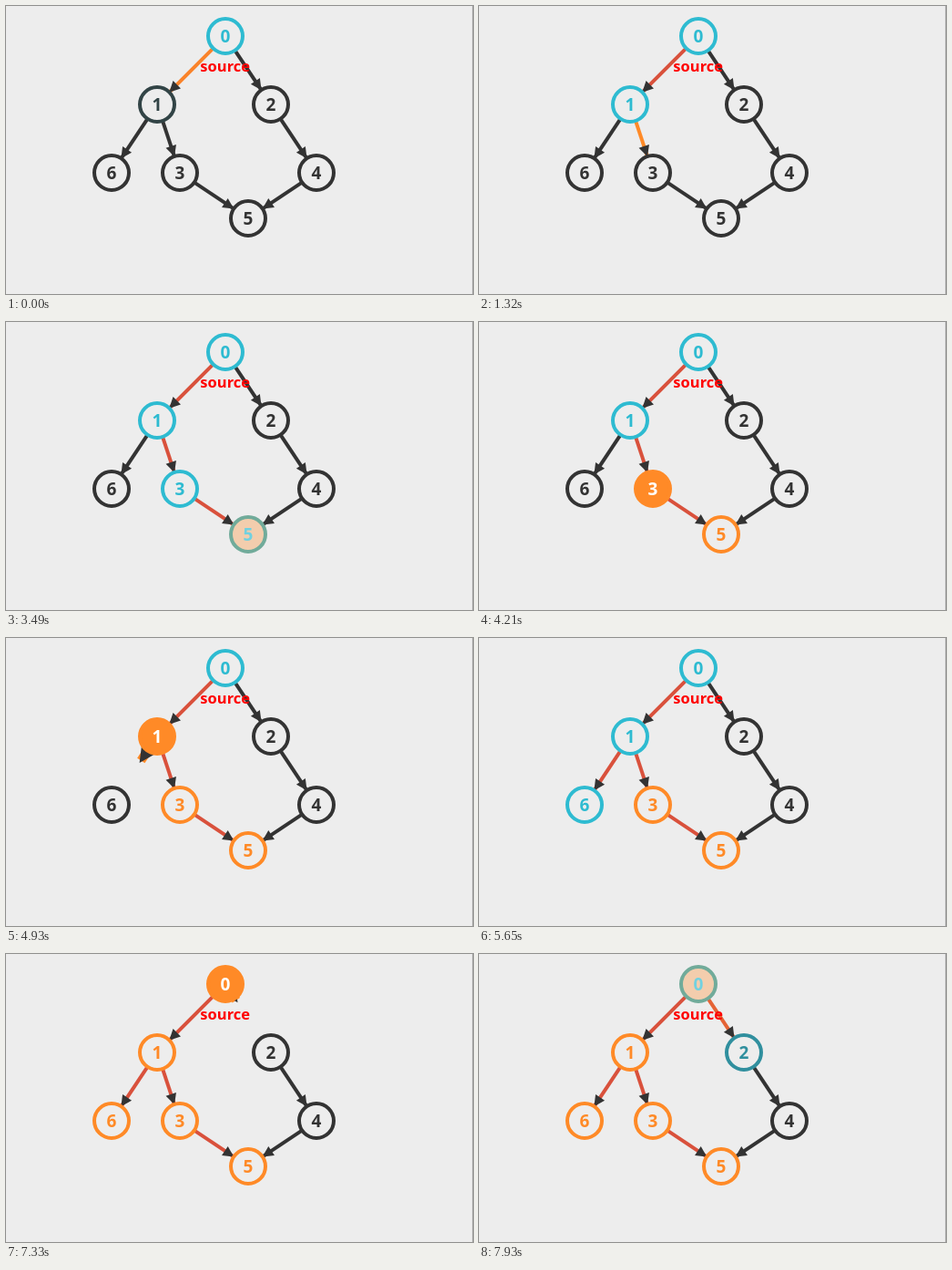
Write an HTML page with a canvas that moves like this. It is 513 by 316 pixels and loops after 8 s.

```html
<!DOCTYPE html>
<html lang="en">
<head>
<meta charset="utf-8">
<title>Depth-first search</title>
<style>
  html, body { margin: 0; width: 100%; height: 100%; overflow: hidden; background: #ededed; }
  canvas { display: block; width: 513px; height: 316px; }
</style>
</head>
<body>
<canvas id="stage"></canvas>
<script>
const WIDTH = 513, HEIGHT = 316, LOOP = 8000, TICK = 120, FADE = 320;
const RING = 19, REACH = 20, LINE = 4, GROWING_LINE = 10;

const PAPER = [237, 237, 237], DARK = [51, 51, 51], WHITE = [255, 255, 255];
const CYAN = [46, 187, 209], ORANGE = [255, 138, 39], RED = [217, 81, 60];

// Node styles are [ring, fill, text]; edge styles are [line].
const idle = [DARK, PAPER, DARK];
const seen = [CYAN, PAPER, CYAN];
const active = [ORANGE, ORANGE, WHITE];
const done = [ORANGE, PAPER, ORANGE];
const plain = [DARK], grow = [ORANGE], tree = [RED];

const nodes = [[241, 33], [166, 108], [291, 108], [191, 183], [341, 183], [266, 233], [116, 183]];
const edges = ['0-1', '0-2', '1-3', '1-6', '2-4', '3-5', '4-5'];

// Each step: start time and the styles it fades to.
const steps = [
  [-100, { '0-1': tree, 1: seen }],
  [440, { 1: active }],
  [920, { 1: seen, '1-3': grow }],
  [1410, { '1-3': tree, 3: seen }],
  [1890, { 3: active }],
  [2390, { 3: seen, '3-5': grow }],
  [2850, { '3-5': tree, 5: seen }],
  [3342, { 5: active }],
  [3840, { 5: done, 3: active }],
  [4328, { 3: done, 1: active }],
  [4795, { '1-6': grow }],
  [5270, { '1-6': tree, 6: seen, 1: seen }],
  [5790, { 6: active }],
  [6280, { 6: done, 1: active }],
  [6765, { 1: done, 0: active }],
  [7260, { '0-2': grow }],
  [7738, { '0-2': tree, 2: seen, 0: seen }]
];

const canvas = document.getElementById('stage');
const ctx = canvas.getContext('2d');
const scale = window.devicePixelRatio || 1;
canvas.width = WIDTH * scale;
canvas.height = HEIGHT * scale;
ctx.scale(scale, scale);
ctx.textAlign = 'center';

const rgb = color => `rgb(${color.map(Math.round).join()})`;
const mix = (from, to, p) => from.map((v, i) => v + (to[i] - v) * p);
const ease = u => u < 0.5 ? 4 * u ** 3 : 1 - 4 * (1 - u) ** 3;

function stateAt(time) {
  const style = {}, length = {};
  nodes.forEach((_, id) => { style[id] = id ? idle : seen; });
  edges.forEach(id => { style[id] = plain; length[id] = 1; });
  style['0-1'] = grow;
  for (const [start, changes] of steps) {
    if (time < start) break;
    const p = ease(Math.min(1, (time - start) / FADE));
    for (const [id, next] of Object.entries(changes)) {
      if (next === grow) {
        style[id] = grow;
        length[id] = p;
      } else {
        style[id] = style[id].map((color, i) => mix(color, next[i], p));
      }
    }
  }
  return { style, length };
}

// A growing edge is thicker, and its arrowhead scales with the line.
function drawEdge(id, [color], length) {
  const [[x1, y1], [x2, y2]] = id.split('-').map(n => nodes[n]);
  const end = REACH + (Math.hypot(x2 - x1, y2 - y1) - 2 * REACH) * length;
  const width = length < 1 ? GROWING_LINE : LINE;
  const tip = end + 0.3 * width, back = tip - 3 * width;
  ctx.save();
  ctx.translate(x1, y1);
  ctx.rotate(Math.atan2(y2 - y1, x2 - x1));
  ctx.strokeStyle = rgb(color);
  ctx.lineWidth = width;
  ctx.beginPath();
  ctx.moveTo(REACH, 0);
  ctx.lineTo(end, 0);
  ctx.stroke();
  ctx.fillStyle = rgb(DARK);
  ctx.beginPath();
  ctx.moveTo(tip, 0);
  ctx.lineTo(back, -1.5 * width);
  ctx.lineTo(back, 1.5 * width);
  ctx.fill();
  ctx.restore();
}

function drawNode(id, [ring, fill, text]) {
  const [x, y] = nodes[id];
  ctx.beginPath();
  ctx.arc(x, y, RING, 0, 2 * Math.PI);
  ctx.fillStyle = rgb(fill);
  ctx.fill();
  ctx.strokeStyle = rgb(ring);
  ctx.lineWidth = LINE;
  ctx.stroke();
  ctx.font = '700 19px "Open Sans", "Noto Sans", sans-serif';
  ctx.fillStyle = rgb(text);
  ctx.fillText(id, x, y + 7);
}

function draw(time) {
  const { style, length } = stateAt(time);
  ctx.fillStyle = rgb(PAPER);
  ctx.fillRect(0, 0, WIDTH, HEIGHT);
  ctx.fillStyle = '#b0b0b0';
  ctx.fillRect(WIDTH - 1, 0, 1, HEIGHT);
  edges.forEach(id => drawEdge(id, style[id], length[id]));
  nodes.forEach((_, id) => drawNode(id, style[id]));
  ctx.font = '700 16.5px "Open Sans", "Noto Sans", sans-serif';
  ctx.fillStyle = '#f00';
  ctx.fillText('source', 240.7, 72);
}

const origin = performance.now();
function frame() {
  const time = (performance.now() - origin) % LOOP;
  draw(Math.floor(time / TICK) * TICK);
  requestAnimationFrame(frame);
}
frame();
</script>
</body>
</html>
```
